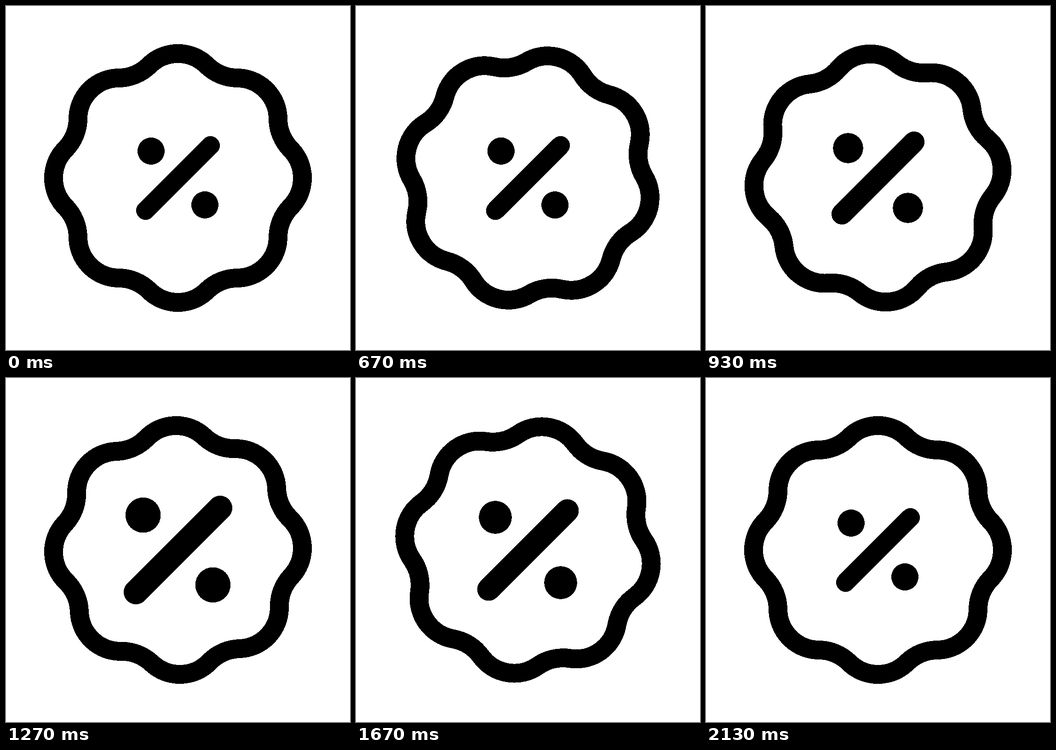
Recreate the animation shown at these times as an HTML page. Size 748 px wide and 748 px high, loop 2200 ms.

```html
<!DOCTYPE html>
<html lang="en">
<head>
<meta charset="utf-8">
<title>Discount badge</title>
<style>
  html, body { margin: 0; width: 100%; height: 100%; overflow: hidden; background: #fff; }
  svg { display: block; width: 100%; height: 100%; }
</style>
</head>
<body>
<svg viewBox="-374 -374 748 748" shape-rendering="crispEdges">
  <g fill="none" stroke="#000" stroke-width="41" stroke-linecap="round">
    <path id="ring"/>
    <g id="percent">
      <path d="M-70.5 70.5 70.5-70.5"/>
      <g fill="#000" stroke="none">
        <circle cx="-58.5" cy="-58.5" r="29.5"/>
        <circle cx="58.5" cy="58.5" r="29.5"/>
      </g>
    </g>
  </g>
</svg>
<script>
const LOOP = 2200, FRAME = 100 / 3;
const ring = document.getElementById('ring');
const percent = document.getElementById('percent');

// Eight lobes: convex arcs joined smoothly by concave ones.
const polar = deg => {
  const a = deg * Math.PI / 180;
  return `${252.8 * Math.sin(a)} ${-252.8 * Math.cos(a)}`;
};
const half = 14.36;
let outline = `M${polar(-half)}`;
for (let a = 0; a < 360; a += 45) {
  outline += `A89.5 89.5 0 0 1 ${polar(a + half)}A95.9 95.9 0 0 0 ${polar(a + 45 - half)}`;
}
ring.setAttribute('d', outline + 'Z');

const clamp = x => Math.min(1, Math.max(0, x));

// Cubic bezier easing (.6, 0, .4, 1)
function ease(x) {
  let lo = 0, hi = 1;
  for (let i = 0; i < 24; i++) {
    const t = (lo + hi) / 2, u = 1 - t;
    if (1.8 * t * u * u + 1.2 * t * t * u + t * t * t < x) lo = t; else hi = t;
  }
  return lo * lo * (3 - 2 * lo);
}

// Half a turn as a smooth curve through [frame, degrees]
const turn = [[11, 0], [20, 13.7], [28, 39.6], [38, 88.7], [44, 118.3], [50, 144.5], [60, 180]];
const slope = i => (turn[i + 1][1] - turn[i][1]) / (turn[i + 1][0] - turn[i][0]);
const tangent = turn.map(([x], i) => {
  if (i === 0) return 0;
  if (i === turn.length - 1) return 3;
  const before = x - turn[i - 1][0], after = turn[i + 1][0] - x;
  return (slope(i - 1) * after + slope(i) * before) / (before + after);
});

function angle(n) {
  if (n <= 11 || n >= 60) return 0;
  const i = turn.findIndex(k => k[0] > n) - 1;
  const [x0, y0] = turn[i], [x1, y1] = turn[i + 1];
  const h = x1 - x0, t = (n - x0) / h, u = 1 - t;
  return y0 * u * u * (1 + 2 * t) + y1 * t * t * (3 - 2 * t)
    + h * t * u * (tangent[i] * u - tangent[i + 1] * t);
}

function scale(n) {
  const k = n < 40 ? ease(clamp((n - 18.3) / 21.7)) : 1 - ease(clamp((n - 40) / 24.6));
  return 1 + 0.3 * k;
}

const start = performance.now();
function draw() {
  const time = (performance.now() - start) % LOOP;
  const n = Math.floor((time + 3.4) / FRAME);
  ring.setAttribute('transform', `rotate(${angle(n)})`);
  percent.setAttribute('transform', `scale(${scale(n)})`);
  requestAnimationFrame(draw);
}
draw();
</script>
</body>
</html>
```
